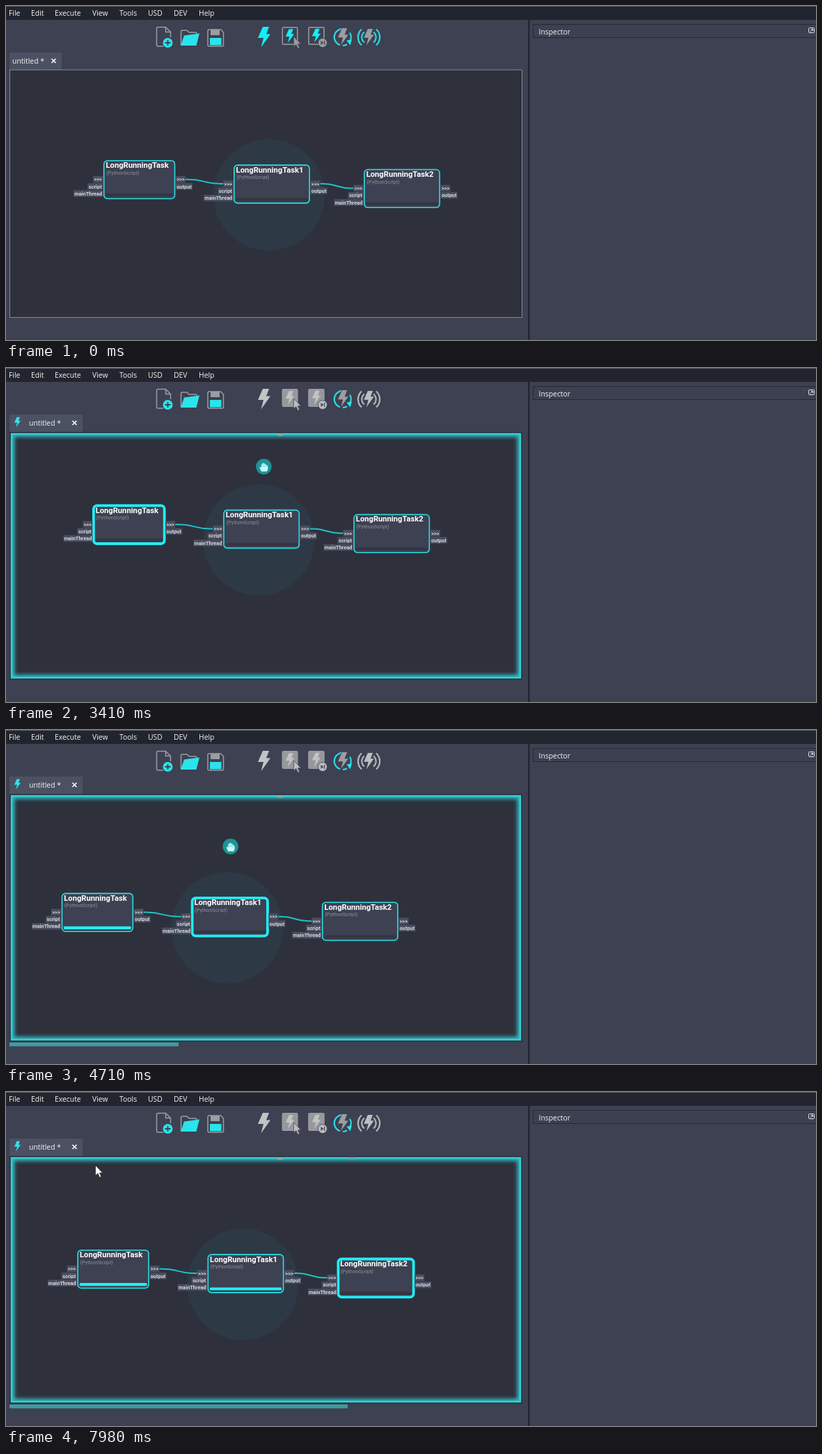
Animation, 1164 px wide and 481 px high, one loop 8000 ms. Source, as an HTML page:

```html
<!DOCTYPE html>
<html lang="en">
<head>
<meta charset="utf-8">
<title>Task graph</title>
<style>
  html, body { margin: 0; width: 100%; height: 100%; overflow: hidden; background: #3d4151; }
  svg { display: block; width: 1164px; height: 481px; }
  .ui { font: 10.4px "Open Sans", "Noto Sans", sans-serif; fill: #f4f5f7; }
  .name { font: bold 11.2px Roboto, sans-serif; fill: #fff; }
  .type { font: 7.4px Roboto, sans-serif; fill: #8d909b; }
  .port text { font: bold 7.4px Roboto, sans-serif; fill: #d5d7de; text-anchor: middle; }
  .port rect { fill: #4a4e5f; }
  .wire { fill: none; stroke: #1fc2c8; stroke-width: 2; }
  .box { fill: #3d4152; stroke: #2cdde4; stroke-width: 1.6; }
  .active .box { stroke: #21eef6; stroke-width: 3.8; }
  .bar { fill: #333640; }
  .done .bar { fill: #21eef6; }
  .line { fill: none; stroke: #9b9da3; stroke-width: 1.5; }
  .cyan { fill: #2be3ea; }
  .grey { fill: #9b9da3; }
  .go { fill: #10f0f8; }
  .arc { fill: none; stroke: #2bd9e2; stroke-width: 2.2; }
  .frame { fill: none; stroke: #30d0d7; }
  .run .go { fill: #c2c3c5; }
  .run .card { fill: #97989b; }
  .run .wave { stroke: #b4b5b9; }
  .run .mute { fill: #bdbec1; }
  svg:not(.run) .live, .run .idle { display: none; }
  .run .label { transform: translateX(24px); }
  .run .close { transform: translateX(30px); }
  .run .tab { width: 105px; }
</style>
</head>
<body>
<svg id="stage" viewBox="0 0 1164 481" xmlns="http://www.w3.org/2000/svg">
  <defs>
    <path id="bolt" d="M-2-14.5H7L3-4H9L-4.500 15L-1 1.500H-9Z"/>
    <path id="arrow" d="M0 0V14.500L3.400 11.500L5.900 17.200L8.200 16.200L5.800 10.700H10.300Z"/>
    <filter id="blur" x="-5%" y="-5%" width="110%" height="110%"><feGaussianBlur stdDeviation="2.6"/></filter>
    <clipPath id="inner"><rect x="7" y="94" width="733" height="353"/></clipPath>
    <clipPath id="view"><rect x="5" y="92" width="737" height="357"/></clipPath>
  </defs>

  <rect width="1164" height="481" fill="#3d4151"/>
  <rect width="1164" height="20" fill="#22252d"/>
  <rect width="1164" height="1" fill="#5b5e66"/>
  <g id="menu" class="ui"></g>

  <rect x="750" y="20" width="2.500" height="461" fill="#242731"/>
  <rect x="757.5" y="26.500" width="408" height="19" fill="#3c4050" stroke="#262933"/>
  <text class="ui" x="765.5" y="41">Inspector</text>
  <g fill="none" stroke="#e4e5e9">
    <rect x="1153.500" y="31.500" width="8" height="7" rx="1"/>
    <path d="M1155.500 37L1159.500 33.500M1156.800 33.500H1159.500V36"/>
  </g>

  <!-- file buttons -->
  <path class="line" d="M226 58H218.500Q216.500 58 216.500 56V32.500Q216.500 30.500 218.500 30.500H229.500L236.500 37.500V45M229.500 30.500V37.500H236.500"/>
  <circle class="cyan" cx="232.500" cy="53" r="7"/>
  <path d="M232.500 49V57M228.500 53H236.500" stroke="#3d4151" stroke-width="1.800"/>
  <path class="line" d="M251.500 56V37Q251.500 35 253.500 35H260L263 38H272Q274 38 274 40V43"/>
  <path class="cyan" d="M256 42.500L278 39.500L273.500 57H251Z"/>
  <path class="line" d="M292 34H308.500L312.500 38V56Q312.500 58 310.500 58H292Q290 58 290 56V36Q290 34 292 34Z"/>
  <path class="grey" d="M294 34H307V42H294Z"/>
  <rect class="cyan" x="293" y="46" width="16.500" height="10.500"/>

  <!-- run buttons -->
  <rect id="hover" x="355" y="29" width="32" height="33" fill="#449ca2"/>
  <use href="#bolt" class="go" x="371" y="44.500"/>
  <rect class="line card" x="397.300" y="30.800" width="21.500" height="24.500" rx="1.500"/>
  <use href="#bolt" class="go" transform="translate(408 43) scale(.68)"/>
  <use href="#arrow" class="grey mute" x="413.500" y="44" stroke="#4b4e5b" stroke-width=".8"/>
  <rect class="line card" x="435" y="30.800" width="22" height="24.500" rx="1.500"/>
  <use href="#bolt" class="go" transform="translate(446 42.500) scale(.68)"/>
  <circle class="grey mute" cx="455" cy="53" r="6.500" stroke="#3d4151" stroke-width=".8"/>
  <path d="M452.500 50L456.500 53L452.500 56ZM457 50H458.300V56H457Z" fill="#454955"/>
  <path class="arc" d="M480 56.300A12 12 0 0 1 487.500 33.500M494 38.500A12 12 0 0 1 494.500 50M490 55.200A12 12 0 0 1 484 57"/>
  <path class="cyan" d="M489.500 49.500L497 48.500L494.500 56.500Z"/>
  <use href="#bolt" class="grey" transform="translate(484.500 44.500) scale(.9)" stroke="#3d4151"/>
  <g class="arc wave">
    <path d="M511 33.500A15.500 15.500 0 0 0 511 56.500M515 37.500A9.500 9.500 0 0 0 515 52.500"/>
    <path d="M532 33.500A15.500 15.500 0 0 1 532 56.500M528 37.500A9.500 9.500 0 0 1 528 52.500"/>
  </g>
  <use href="#bolt" class="grey mute" transform="translate(521.500 44.500) scale(.8)"/>

  <!-- tab -->
  <rect class="tab" x="5" y="67" width="75" height="25" fill="#4b5063"/>
  <use href="#bolt" class="cyan live" transform="translate(16.500 78) scale(.5)"/>
  <text class="ui label" x="9" y="83">untitled *</text>
  <path class="close" d="M65.500 76L71.500 82M71.500 76L65.500 82" stroke="#fff" stroke-width="1.600"/>

  <!-- graph -->
  <rect x="5" y="92" width="737" height="357" fill="#2e313c"/>
  <rect class="idle" x="5.500" y="92" width="736" height="356.500" fill="none" stroke="#858893"/>
  <g clip-path="url(#view)"><g id="graph"><circle cx="378" cy="272" r="80" fill="#2d3a46"/></g></g>
  <g class="live">
    <g clip-path="url(#inner)">
      <rect class="frame" x="7" y="94" width="733" height="353" stroke-width="11" opacity=".8" filter="url(#blur)"/>
    </g>
    <rect class="frame" x="8" y="95" width="731" height="351" stroke-width="2.500"/>
    <rect x="390" y="95" width="8" height="2.500" fill="#8fa5a8"/>
    <rect id="smudge" x="491" y="95" width="10" height="2.500" fill="#58a0a4"/>
  </g>
  <rect id="total" x="5" y="450" height="5.500" fill="#409ba1"/>

  <circle id="click" r="11" fill="#c3cd2c" opacity=".85"/>
  <use id="pointer" href="#arrow" stroke="#23252c" stroke-width=".7"/>
  <g id="hand">
    <circle r="11.200" fill="#1f9299"/>
    <path d="M-3.500 7L-6 1.500Q-6 0-4.500 .5L-3.500 2V-3Q-2.800-4.500-2-3V-4.500Q-1-6 0-4.500V-4Q1-5.500 2-4V-3Q3.200-4 4-2.500V-1.500Q5.500-2 6-.5V3.500L4.500 7Z" fill="#c5fbfb"/>
    <path d="M-2-3V1M0-4V1M2-3V1M4-1.500V1" stroke="#4fb4b9" stroke-width=".5"/>
  </g>
</svg>
<script>
const LOOP = 8000, FIRST = 390, STEP = 67.1;
const HOVER = 1250, START = 1790, TASK = 2105;
const CLICK = [1480, 1640], DRAG = [2470, 4960];
const ORBIT = 940, TOP = 3410, REST = [-37.5, 5];

// Where the pointer turns or pauses: [time, x, y].
const stops = [
  [390, 984, 366], [1290, 373, 53], [1660, 373, 53], [2070, 398, 170], [4960, 357, 175],
  [5430, 505, 112], [5860, 525, 30], [6640, 473, 339], [7000, 477, 339], [7100, 514, 355],
  [7540, 514, 355], [7660, 824, 401], [7890, 16, 190], [7980, 131, 104]
];

const $ = id => document.getElementById(id);
const stage = $("stage"), graph = $("graph");
const show = (id, on) => { $(id).style.display = on ? "" : "none"; };
const move = (el, [x, y]) => el.setAttribute("transform", `translate(${x} ${y})`);
const within = (t, [a, b]) => t >= a && t < b;
const mix = (a, b, u) => a.map((v, i) => v + (b[i] - v) * u);
function ease(t, from, to) {
  const u = Math.min(1, Math.max(0, (t - from) / (to - from)));
  return u * u * (3 - 2 * u);
}

function pointerAt(t) {
  const i = Math.max(1, stops.findIndex(s => s[0] > t));
  const [from, ...a] = stops[i - 1], [to, ...b] = stops[i];
  return mix(a, b, ease(t, from, to));
}

// The graph is swung round in widening circles, then let go.
function panAt(t) {
  const turns = (t - TOP) / ORBIT, angle = turns * 2 * Math.PI;
  const swing = [
    -15 - 3.5 * turns - 51.4 * Math.sin(angle),
    5 - (33.5 + 8 * turns) * Math.cos(angle - .49)
  ];
  return mix(mix([0, 0], swing, ease(t, 2440, 2700)), REST, ease(t, 4760, 4920));
}

function port(x, row, w, label) {
  const y = 22.2 + row * 10.25;
  return `<g class="port"><rect x="${x}" y="${y}" width="${w}" height="9.4"/>
    <text x="${x + w / 2}" y="${y + 7.4}">${label}</text></g>`;
}
function node({ name, x, y, w }) {
  return `<g class="node" transform="translate(${x} ${y})">
    <rect class="box" width="${w}" height="54.8" rx="5"/>
    <rect class="bar" x="2.5" y="47.3" width="${w - 5}" height="4.2" rx="1.5"/>
    <text class="name" x="2.8" y="10.5">${name}</text>
    <text class="type" x="3.5" y="20">(PythonScript)</text>
    ${port(-15.5, 0, 14, "&gt;&gt;&gt;")}${port(-23.5, 1, 22, "script")}${port(-43.5, 2, 42, "mainThread")}
    ${port(w + 1.5, 0, 14, "&gt;&gt;&gt;")}${port(w + 1.5, 1, 24, "output")}</g>`;
}
function wire(a, b) {
  const x = a.x + a.w + 15.5, end = b.x - 15.5, mid = (x + end) / 2;
  const y = a.y + 27, low = b.y + 27;
  return `<path class="wire" d="M${x} ${y}h4C${mid} ${y} ${mid} ${low} ${end - 4} ${low}h4"/>`;
}

const tasks = ["", "1", "2"].map((suffix, i) => ({
  name: "LongRunningTask" + suffix,
  x: 140.7 + 187.1 * i, y: 222.7 + 6.4 * i, w: suffix ? 108.3 : 101.8
}));
graph.innerHTML += tasks.slice(1).map((b, i) => wire(tasks[i], b)).join("") + tasks.map(node).join("");
const nodes = graph.querySelectorAll(".node");

const menu = { File: 4, Edit: 36, Execute: 70, View: 124, Tools: 163, USD: 204, DEV: 241, Help: 277 };
$("menu").innerHTML = Object.entries(menu)
  .map(([name, x]) => `<text x="${x}" y="13.5">${name}</text>`).join("");

function draw(now) {
  const time = now % LOOP;
  const t = time < FIRST ? 0 : FIRST + Math.floor((time - FIRST) / STEP + .05) * STEP;
  const running = t >= START, drag = within(t, DRAG), click = within(t, CLICK);
  const done = Math.max(0, Math.floor((t - START) / TASK));

  stage.classList.toggle("run", running);
  show("hover", t >= HOVER && !running);
  show("smudge", t >= 6060);
  $("total").setAttribute("width", done * 243);
  nodes.forEach((n, i) => {
    n.classList.toggle("active", running && i === done);
    n.classList.toggle("done", i < done);
  });

  const pan = panAt(t), [x, y] = pointerAt(t);
  move(graph, pan);

  move($("pointer"), [x, y]);
  $("pointer").setAttribute("fill", click ? "#f5f9c4" : "#fff");
  show("pointer", t >= FIRST && !drag);
  move($("click"), [x, y + 1]);
  show("click", click);

  // The grip slides slowly against the graph.
  const slip = (t - DRAG[0]) / 1610;
  move($("hand"), [pan[0] + 387 - 3 * slip, pan[1] + 175 - 14.5 * slip]);
  show("hand", drag);
}

function tick() {
  draw(performance.now());
  requestAnimationFrame(tick);
}
tick();
</script>
</body>
</html>
```
